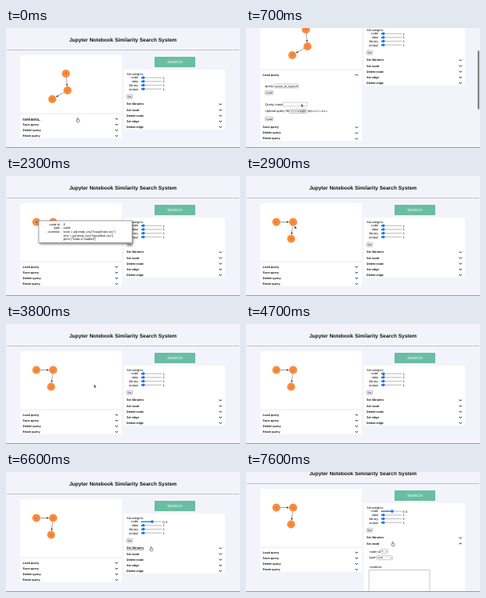
These frames come from a looping animation (293x150 px, 8000 ms). An HTML page with a canvas:

```html
<!DOCTYPE html>
<html lang="en">
<head>
<meta charset="utf-8">
<title>Jupyter Notebook Similarity Search System</title>
<style>
html, body { margin: 0; width: 100%; height: 100%; overflow: hidden; background: #f3f4fb; }
canvas { display: block; width: 293px; height: 150px; }
</style>
</head>
<body>
<canvas id="stage"></canvas>
<script>
const W = 293, H = 150, LOOP = 8000, STEP = 100;
const canvas = document.getElementById('stage');
const dpr = window.devicePixelRatio || 1;
canvas.width = W * dpr;
canvas.height = H * dpr;
const ctx = canvas.getContext('2d');
const SANS = '"Liberation Sans", Arial, sans-serif';
const CJK = '"Noto Sans CJK JP", "Noto Sans CJK", sans-serif';
const BLUE = '#1976e8';

// [time, x, y] of the pointer
const pointerPath = [
  [0, 90, 115], [300, 90, 115], [700, 70, 96], [900, 60, 88], [1200, 49, 104],
  [1500, 29, 81], [1700, 42, 70], [2000, 38, 57], [2600, 38, 57], [3200, 85, 70],
  [3700, 111, 77], [4100, 111, 77], [4500, 172, 62], [4700, 172, 62], [5100, 183, 62],
  [5500, 174, 95], [6300, 174, 95], [6600, 182, 96], [6800, 184, 102],
  [7100, 184, 90], [LOOP, 184, 90]
];
const scrollPath = [
  [0, 0], [200, 0], [700, 55], [1400, 55], [1700, 0],
  [6800, 0], [7100, 13], [LOOP, 13]
];
const weightPath = [[0, 0], [4700, 0], [5100, 1], [LOOP, 1]];
const firstGraph = [[75, 57], [77, 78], [58, 89]];
const loadedGraph = [[38, 57.5], [59, 57.5], [56.5, 78.5]];

function sample(path, t) {
  let i = 1;
  while (i < path.length - 1 && path[i][0] < t) i++;
  const a = path[i - 1], b = path[i];
  const u = Math.max(0, Math.min(1, (t - a[0]) / (b[0] - a[0])));
  const e = u * u * (3 - 2 * u);
  return a.slice(1).map((v, k) => v + (b[k + 1] - v) * e);
}

const between = (t, from, to) => t >= from && t < to;

// Layout is measured at ten times the size so small text keeps its true spacing.
function text(str, x, y, size = 4, { bold = false, color = '#111', align = 'left', family = SANS } = {}) {
  ctx.save();
  ctx.translate(x, y);
  ctx.scale(0.1, 0.1);
  ctx.font = `${bold ? 'bold ' : ''}${size * 10}px ${family}`;
  ctx.textRendering = 'geometricPrecision';
  ctx.textAlign = align;
  ctx.fillStyle = color;
  ctx.fillText(str, 0, 0);
  ctx.restore();
}

function rect(x, y, w, h, color) {
  ctx.fillStyle = color;
  ctx.fillRect(x, y, w, h);
}

function line(x1, y1, x2, y2, color, width = 0.5) {
  ctx.strokeStyle = color;
  ctx.lineWidth = width;
  ctx.beginPath();
  ctx.moveTo(x1, y1);
  ctx.lineTo(x2, y2);
  ctx.stroke();
}

function disc(x, y, r, color) {
  ctx.fillStyle = color;
  ctx.beginPath();
  ctx.arc(x, y, r, 0, Math.PI * 2);
  ctx.fill();
}

function box(x, y, w, h, fill = '#fff', stroke = '#888', radius = 0.7) {
  ctx.beginPath();
  ctx.roundRect(x, y, w, h, radius);
  ctx.fillStyle = fill;
  ctx.fill();
  ctx.strokeStyle = stroke;
  ctx.lineWidth = 0.4;
  ctx.stroke();
}

function button(label, x, y, w) {
  box(x, y, w, 5, '#eee', '#888', 1);
  text(label, x + w / 2, y + 3.7, 3.3, { align: 'center' });
}

function select(label, x, y, w) {
  box(x, y, w, 5, '#f8f8f8', '#888', 1);
  text(label, x + 1.3, y + 3.6, 3);
  chevron(x + w - 2, y + 2.6, false, 0.7);
}

function chevron(x, y, up, s = 1.5) {
  const d = up ? -s / 2 : s / 2;
  ctx.strokeStyle = '#111';
  ctx.lineWidth = s > 1 ? 0.95 : 0.5;
  ctx.beginPath();
  ctx.moveTo(x - s, y - d);
  ctx.lineTo(x, y + d);
  ctx.lineTo(x + s, y - d);
  ctx.stroke();
}

function row(label, x, y, open, hover) {
  text(label, x, y + 1.3, 3.75, { bold: true });
  if (hover) line(x, y + 2.1, x + 22, y + 2.1, '#111', 0.45);
  chevron(x + 117.5, y + 0.3, open);
}

function edge([x1, y1], [x2, y2]) {
  const a = Math.atan2(y2 - y1, x2 - x1), c = Math.cos(a), s = Math.sin(a);
  line(x1 + c * 5, y1 + s * 5, x2 - c * 6, y2 - s * 6, '#666', 0.6);
  ctx.save();
  ctx.translate(x2 - c * 5, y2 - s * 5);
  ctx.rotate(a);
  ctx.fillStyle = '#444';
  ctx.beginPath();
  ctx.moveTo(0, 0);
  ctx.lineTo(-3, -1.3);
  ctx.lineTo(-3, 1.3);
  ctx.fill();
  ctx.restore();
}

function graph(nodes) {
  edge(nodes[0], nodes[1]);
  edge(nodes[1], nodes[2]);
  nodes.forEach(([x, y], i) => {
    disc(x, y, 5, '#fb8b3c');
    text(String(i), x, y + 1.3, 3.6, { color: '#8a4c22', align: 'center' });
  });
}

function header() {
  text('Jupyter Notebook Similarity Search System', 146.5, 16.8, 6.5, { bold: true, align: 'center' });
  line(1, 27.5, 292, 27.5, '#b4b5be', 0.8);
}

function queryForm() {
  text('query:', 24, 129.3, 4);
  select('sample_06_fragment', 35, 125, 31);
  button('Load', 24, 133.3, 10);
  text('Query name:', 24, 151.6, 4.1);
  box(46, 148, 31, 4.7);
  text('Upload query file:', 24, 160.3, 4.1);
  box(54, 156.6, 22, 5, '#eee', '#888', 1);
  text('ファイルを選択', 65, 160.2, 2.8, { align: 'center', family: CJK });
  text('選択されていません', 77.2, 160.2, 2.85, { family: CJK });
  button('Load', 24, 166, 10);
}

function leftColumn(t) {
  const open = between(t, 200, 1600);
  const extra = open ? 58.5 : 0;
  rect(18, 34, 127, 72, '#fff');
  graph(t < 1500 ? firstGraph : loadedGraph);
  rect(18, 108.5, 127, 29 + extra, '#fff');
  row('Load query', 21, 113.3, open, t < 200);
  if (open) queryForm();
  ['Save query', 'Delete query', 'Reset query'].forEach((label, i) =>
    row(label, 21, 120.4 + i * 7.1 + extra));
}

function slider(label, y, value, knob) {
  text(label, 166.3, y + 1.3, 4, { align: 'right' });
  line(169, y, 195, y, '#c4c4c8', 1.2);
  line(169, y, knob, y, BLUE, 1.2);
  disc(knob, y, 1.8, BLUE);
  text(value, 196.3, y + 1.4, 4);
}

function libraryForm() {
  text('libraries:', 155, 105, 4);
  box(154, 108, 76, 28);
  button('Set', 154, 140, 7.5);
}

function nodeForm() {
  text('node id:', 154.5, 113.5, 4);
  select('0', 168.5, 109.6, 9);
  text('type:', 154.5, 121.4, 4);
  select('code', 163.5, 117.7, 20);
  text('contents:', 154.5, 133.2, 4);
  box(154, 135.5, 76, 40, '#fff', '#777', 0);
  button('Set', 154, 178, 7.5);
}

function rightColumn(t) {
  const libs = between(t, 5800, 6400);
  const node = t >= 6800;
  const libsExtra = libs ? 50 : 0;
  const nodeExtra = node ? 80 : 0;
  rect(186, 36, 51, 13, '#69bea3');
  text('SEARCH', 211.5, 44.2, 4.6, { color: '#fff', align: 'center' });
  rect(147.5, 52, 126.5, 74.5 + libsExtra + nodeExtra, '#fff');
  text('Set weights', 151, 59.2, 4);
  const [u] = sample(weightPath, t);
  slider('code:', 62.1, u ? String(Math.round((1 - u / 2) * 10) / 10) : '1', 172 + 11 * u);
  ['data:', 'library:', 'output:'].forEach((label, i) => slider(label, 66.8 + i * 4.7, '1', 172));
  button('Set', 151, 83.2, 7.5);
  row('Set libraries', 151, 95, libs, between(t, 5500, 6700));
  if (libs) libraryForm();
  row('Set node', 151, 102.2 + libsExtra, node);
  if (node) nodeForm();
  ['Delete node', 'Set edge', 'Delete edge'].forEach((label, i) =>
    row(label, 151, 109.3 + i * 7.1 + libsExtra + nodeExtra));
}

function tooltip() {
  ctx.save();
  ctx.shadowColor = 'rgba(0,0,0,.55)';
  ctx.shadowBlur = 3 * dpr;
  ctx.shadowOffsetX = ctx.shadowOffsetY = dpr;
  rect(41, 56, 117, 27.5, '#fff');
  ctx.restore();
  ctx.strokeStyle = '#777';
  ctx.lineWidth = 0.6;
  ctx.strokeRect(41, 56, 117, 27.5);
  ['node id :', 'type :', 'contents :'].forEach((label, i) =>
    text(label, 69.5, 61.5 + i * 4.7, 4, { align: 'right' }));
  [
    '0', 'code',
    'train = pd.read_csv("input/train.csv")',
    'test = pd.read_csv("input/test.csv")',
    'print ("Data is loaded")'
  ].forEach((value, i) => text(value, 72, 61.5 + i * 4.7, 4.05));
}

function shape(points, fill, stroke) {
  ctx.beginPath();
  points.forEach(([x, y]) => ctx.lineTo(x, y));
  ctx.closePath();
  ctx.fillStyle = fill;
  ctx.fill();
  ctx.strokeStyle = stroke;
  ctx.lineWidth = 0.5;
  ctx.stroke();
}

function pointer(x, y, hand) {
  ctx.save();
  ctx.translate(x, y);
  if (hand) {
    shape([[-0.9, -2.5], [0, -2.5], [0.2, -0.6], [2, -0.2], [2, 1.3], [1.3, 2.8], [-0.8, 2.8], [-2.1, 0.7], [-1.5, 0.2], [-0.9, 0.7]], '#fff', '#222');
  } else {
    shape([[-0.8, -1.5], [-0.8, 2.9], [0.2, 2], [0.9, 3.4], [1.6, 3], [0.9, 1.7], [2.3, 1.7]], '#111', '#fff');
  }
  ctx.restore();
}

function draw(t) {
  const [scroll] = sample(scrollPath, t);
  ctx.setTransform(dpr, 0, 0, dpr, 0, 0);
  rect(0, 0, W, H, '#f3f4fb');
  ctx.save();
  ctx.translate(0, -scroll);
  header();
  leftColumn(t);
  rightColumn(t);
  ctx.restore();
  if (between(t, 300, 1700) || between(t, 6900, 7400)) {
    box(290.3, 1 + scroll * 0.5, 1.7, 73, '#777', '#777', 0.8);
  }
  const [x, y] = sample(pointerPath, t);
  pointer(x, y, t < 400 || t >= 5400);
  if (between(t, 2000, 2700)) tooltip();
  rect(0, 149, W, 1, '#9a9ba3');
}

const start = performance.now();
function tick() {
  const t = (performance.now() - start) % LOOP;
  draw(Math.floor(t / STEP) * STEP);
  requestAnimationFrame(tick);
}
tick();
</script>
</body>
</html>
```
